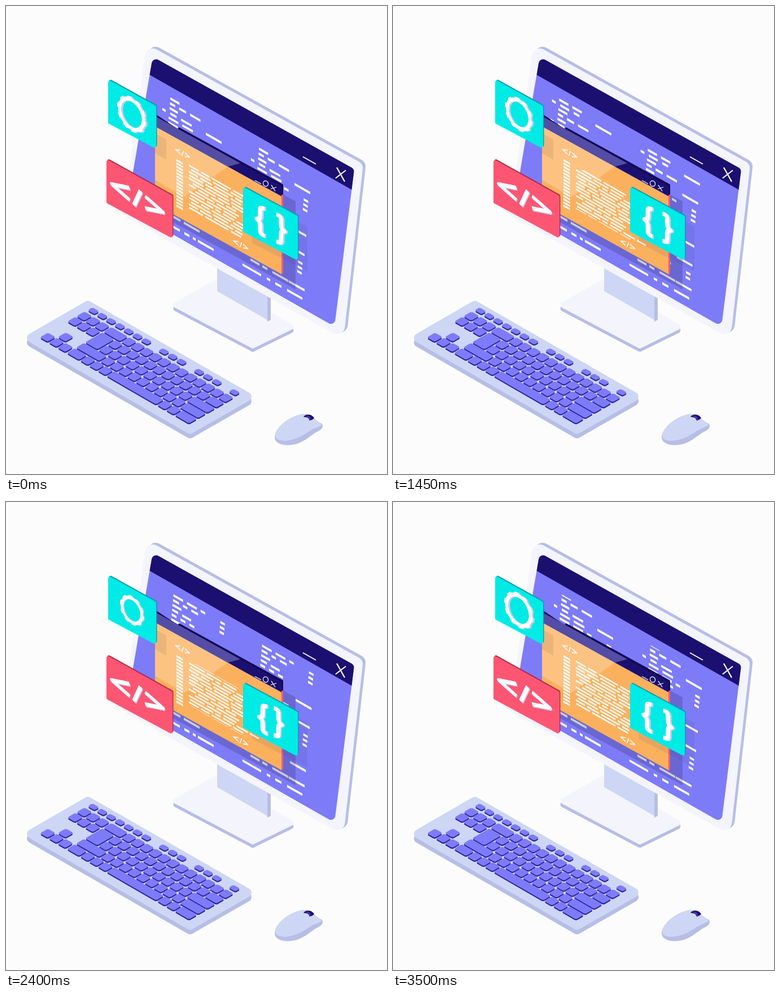
Recreate the animation shown at these times as an HTML page with a canvas. Size 675 px wide and 829 px high, loop 3.55 s.

```html
<!DOCTYPE html>
<html lang="en">
<head>
<meta charset="utf-8">
<title>Isometric coding desk</title>
<style>
html, body { margin: 0; width: 100%; height: 100%; overflow: hidden; background: #fcfcfd; }
canvas { display: block; width: 675px; height: 829px; }
</style>
</head>
<body>
<canvas id="stage" width="675" height="829"></canvas>
<script>
const c = document.getElementById('stage').getContext('2d');
const LOOP = 3550, LAST = 3500, STEP = 50, CYCLE = 1750;
const SLOPE = 0.57;
const NAVY = '#1b1070', VIOLET = '#7d7bf8', PALE = '#cdd6f4', EDGE = '#b6bee6',
      WHITE = '#fff', FRAME = '#f4f4fc', TEAL = '#00ebe6', RED = '#fd5672', ORANGE = '#fbb05e',
      SHADE = '#c9cef0', SHADOW = 'rgba(50,45,100,.25)';

function seeded(seed) {
  return () => {
    seed = (seed * 16807) % 2147483647;
    return seed / 2147483647;
  };
}

// A row is a list of [start, length] words
function words(rand, from, to, min, max, gap) {
  const row = [];
  for (let x = from; x < to - min;) {
    const len = Math.min(min + (max - min) * rand(), to - x);
    row.push([x, len]);
    x += len + gap;
  }
  return row;
}

// Two outdented statements, a column of short marks, plain words elsewhere
function makePage() {
  const rand = seeded(41);
  return Array.from({ length: 13 }, (_, i) => {
    if (i % 9 === 0) return [...words(rand, -15, 40, 6, 19, 8), [62, 28]];
    const row = words(rand, -3, 16 + 40 * rand(), 7, 19, 7);
    if (i >= 2 && i <= 4) row.push([80, 8]);
    return row;
  });
}

function makeCode() {
  const rand = seeded(7);
  return Array.from({ length: 10 }, (_, i) =>
    words(rand, 12 * rand() * (i % 2), i % 5 === 4 ? 124 : 80 + 18 * rand(), 7, 44, 4));
}

const pageRows = makePage(), codeRows = makeCode();

function trace(pts, r = 0) {
  const n = pts.length, [p, q] = [pts[n - 1], pts[0]];
  c.beginPath();
  c.moveTo((p[0] + q[0]) / 2, (p[1] + q[1]) / 2);
  pts.forEach((a, i) => {
    const b = pts[(i + 1) % n];
    c.arcTo(a[0], a[1], b[0], b[1], r);
  });
  c.closePath();
}
function poly(fill, r, ...pts) {
  trace(pts, r);
  c.fillStyle = fill;
  c.fill();
}
function at(m, draw) {
  c.save();
  c.transform(...m);
  draw();
  c.restore();
}
function line(color, width, ...pts) {
  c.beginPath();
  pts.forEach(p => c.lineTo(...p));
  c.strokeStyle = color;
  c.lineWidth = width;
  c.stroke();
}
function blob(fill, path) {
  c.fillStyle = fill;
  c.fill(new Path2D(path));
}
const shift = (pts, dx, dy) => pts.map(([x, y]) => [x + dx, y + dy]);

function textRow(row, x, y, h) {
  at([1, SLOPE, 0, 1, x, y - h / 2], () => {
    for (const [start, len] of row) c.fillRect(start, 0, len, h);
  });
}
function textRows(rows, x, y, dx, dy, h) {
  rows.forEach((row, i) => textRow(row, x + dx * i, y + dy * i, h));
}

function stand() {
  const base = [[291, 530], [370, 485], [515, 569], [437, 607]];
  poly(EDGE, 5, ...shift(base, 0, 6));
  poly(FRAME, 5, ...base);
  poly(PALE, 0, [374, 440], [463, 490], [463, 556], [374, 505]);
  poly(EDGE, 0, [463, 490], [469, 490], [469, 556], [463, 559]);
}

function monitor() {
  const front = [[249, 67], [633, 280], [598, 590], [207, 371]];
  poly(EDGE, 14, ...shift(front, 5, -3));
  poly(FRAME, 14, ...front);
}

function screen(t) {
  c.save();
  trace([[260, 90], [617, 289], [582, 568], [214, 358]], 8);
  c.clip();
  c.fillStyle = VIOLET;
  c.fillRect(200, 80, 440, 500);
  poly(NAVY, 0, [230, 60], [640, 280], [640, 341], [230, 108]);
  c.fillStyle = WHITE;

  c.save();
  trace([[268, 146], [565, 316], [565, 509], [268, 340]]);
  c.clip();
  for (let k = -1; k < 5; k++) {
    const x = 292 - 10 * k + 0.008 * t, y = 191 + 110 * (k - t / CYCLE);
    for (const col of [0, 1]) textRows(pageRows, x + 157 * col, y + 89 * col, -0.77, 8.46, 4.2);
  }
  c.restore();

  textRow([[0, 13], [19, 28]], 296, 373, 4.2);
  textRow([[0, 12], [20, 9], [35, 5], [44, 28]], 296, 391, 4.2);
  textRow([[0, 16], [21, 9], [39, 28], [68, 28]], 433, 449, 4.2);
  textRow([[0, 33], [43, 6], [58, 11], [79, 27]], 419, 458, 4.2);
  c.restore();

  line(WHITE, 2, [526, 267], [549, 280]);
  line(WHITE, 2.2, [586, 286], [600, 311]);
  line(WHITE, 2.2, [602, 291], [584, 305]);
}

function codeWindow(t) {
  poly(SHADOW, 0, [287, 222], [513, 346], [513, 502], [287, 378]);
  poly('#fb5c68', 0, [486, 332], [491, 334], [491, 474], [486, 476]);
  poly('#130a55', 2, [264, 191], [267, 193], [491, 316], [491, 336], [264, 212]);
  poly(ORANGE, 0, [264, 212], [488, 336], [488, 475], [264, 351]);
  poly(NAVY, 0, [264, 195], [488, 319], [488, 337], [264, 213]);

  // Glare over the upper left
  poly('#544da6', 0, [264, 195], [415, 278.6], [393, 284.5], [264, 213]);
  poly('rgba(255,255,255,.22)', 0, [264, 213], [393, 284.5], [316, 338], [264, 308]);
  poly('rgba(90,60,80,.1)', 0, [264, 226], [284, 236], [284, 272], [264, 261]);

  line(WHITE, 1.3, [441, 309], [452, 315]);
  c.beginPath();
  c.ellipse(460, 314.5, 4.4, 5, -0.4, 0, 7);
  c.stroke();
  line(WHITE, 1.3, [470, 317], [477, 328]);
  line(WHITE, 1.3, [479, 321], [469, 324]);

  for (const [x, y] of [[313, 261], [416, 423]]) {
    at([0.28, 0.15, 0, 0.32, x, y], () => codeTag(WHITE, 5));
  }

  c.fillStyle = WHITE;
  for (let i = 0; i < 15; i++) textRow([[0, 11.5]], 302, 273 + 5.75 * i, 3.3);

  c.save();
  trace([[322, 279], [460, 357.7], [460, 436.7], [322, 358]]);
  c.clip();
  const page = 57.5, y = 282 - page * (2 * t / CYCLE % 1);
  for (let k = 0; k < 3; k++) textRows(codeRows, 324, y + page * k, 0, page / 10, 2.8);
  c.restore();
}

function card(face, side, pts) {
  poly(side, 3, ...shift(pts, 1.5, -1.5));
  poly(face, 3, ...pts);
}

function codeTag(color, width) {
  for (const s of [-1, 1]) line(color, width, [s * 14, -10.5], [s * 45, 0], [s * 14, 10.5]);
  line(color, width, [6, -16], [-6, 16]);
}

function brace(color, flip) {
  c.beginPath();
  c.moveTo(8 * flip, -24);
  c.bezierCurveTo(-flip, -24, 0, -21, 0, -14);
  c.bezierCurveTo(0, -5, 0, -2, -6 * flip, 0);
  c.bezierCurveTo(0, 2, 0, 5, 0, 14);
  c.bezierCurveTo(0, 21, -flip, 24, 8 * flip, 24);
  c.strokeStyle = color;
  c.lineWidth = 7.5;
  c.stroke();
}

function ring(r, width, teeth) {
  const tooth = Math.PI * r / teeth;
  c.lineWidth = width;
  c.setLineDash(teeth ? [tooth, tooth] : []);
  c.beginPath();
  c.arc(0, 0, r, 0, 2 * Math.PI);
  c.stroke();
}
function gear(color) {
  c.strokeStyle = color;
  ring(21.3, 5.4, 0);
  ring(24.4, 2.6, 10);
}

function cards(t) {
  const lift = 0.5 + 0.5 * Math.cos(2 * Math.PI * t / CYCLE);
  c.lineJoin = 'round';

  card(TEAL, '#0b9fb0', [[181, 130], [266, 177], [266, 253], [181, 208]]);
  const s = 0.79 + 0.2 * lift, depth = 1 + lift;
  const pose = d => [s, 0.54 * s, 0, 1.2 * s, 223.5 + d, 192 + d * 0.3];
  at(pose(depth), () => gear(SHADE));
  at(pose(-depth * 0.6), () => gear(WHITE));

  card(RED, '#b8294c', [[178, 271], [295, 336], [295, 412], [178, 349]]);
  at([1, 0.54, 0, 1, 234, 342], () => codeTag(SHADE, 6.5));
  at([1, 0.54, 0, 1, 232.5, 340], () => codeTag(WHITE, 6.5));

  poly('rgba(50,45,100,.09)', 0, [436, 341], [534, 391], [534, 470], [436, 420]);
  card(TEAL, '#0b9fb0', [[420, 320], [517, 372], [517, 451], [420, 400]]);
  const gap = 5.5 * lift;
  for (const [flip, x, y] of [[1, 456 - gap, 384 - gap * 0.75], [-1, 482 + gap, 391 + gap]]) {
    at([1, 0.4, 0, 1, x + 1.5 + lift, y + 1], () => brace(SHADE, flip));
    at([1, 0.4, 0, 1, x - 0.5, y], () => brace(WHITE, flip));
  }
}

// Keys in board units: [column, row, width, height], from their centre
function makeKeys() {
  const keys = [], add = (x, y, w = 1, h = 1) => keys.push([x, y, w, h]);
  for (let i = 0; i < 17; i++) if (i < 4 || i % 4 !== 3) add(i, 0, 0.9, 0.65);
  for (let i = 0; i < 3; i++) [1, 2, 5].forEach(row => add(i, row));
  add(1, 4);

  const left = 2.56, total = 14;
  const run = (row, x, widths) => widths.forEach(w => {
    add(left + x + w / 2, row, w);
    x += w;
  });
  const ones = n => Array(n).fill(1);
  run(1, 0, [2, ...ones(total - 2)]);
  add(left + 0.75, 2.5, 1.5, 2);
  run(2, 1.5, [...ones(11), 1.5]);
  run(3, 1.5, [...ones(10), 2.5]);
  run(4, 0, [2.75, ...ones(9), 2.25]);
  run(5, 0, [1.5, ...ones(3), 5.75, ...ones(2), 1.75]);
  return keys;
}
const keys = makeKeys();

function keyboard() {
  const body = [[29, 588], [145, 521], [443, 692], [326, 759]];
  poly(EDGE, 8, ...shift(body, 0, 8));
  poly(PALE, 8, ...body);

  const U = 15.6, V = 16.2, GAP = 1.9;
  for (const [fill, dy] of [['#2c2296', 2.3], [VIOLET, 0]]) {
    at([1, 0.577, -1, 0.577, 155, 540 + dy], () => {
      c.fillStyle = fill;
      c.beginPath();
      for (const [x, y, w, h] of keys) {
        c.roundRect((x - w / 2) * U + GAP / 2, (y - h / 2) * V + GAP / 2, w * U - GAP, h * V - GAP, 3);
      }
      c.fill();
    });
  }
}

function mouse() {
  blob(EDGE, 'M476 764C477 745 504 727 524 723C542 721 548 736 558 739C563 742 562 748 555 752C543 757 535 768 517 775C500 780 477 779 476 764Z');
  blob(PALE, 'M477 760C480 743 505 726 524 723C542 721 548 736 557 739C560 741 559 744 553 746C538 750 530 761 511 767C495 772 477 772 477 760Z');
  blob(NAVY, 'M527 728C530 722 542 722 546 730C542 734 539 734 537 734C538 730 533 728 527 728Z');
  blob('#4037ad', 'M530 726C535 724 541 728 540 733L537 734C538 730 534 728 530 726Z');
}

function draw(now) {
  const t = Math.min(Math.floor(now % LOOP / STEP) * STEP, LAST);
  c.fillStyle = '#fcfcfd';
  c.fillRect(0, 0, 675, 829);
  stand();
  monitor();
  screen(t);
  codeWindow(t);
  cards(t);
  keyboard();
  mouse();
}

const start = performance.now();
function tick() {
  draw(performance.now() - start);
  requestAnimationFrame(tick);
}
tick();
</script>
</body>
</html>
```
